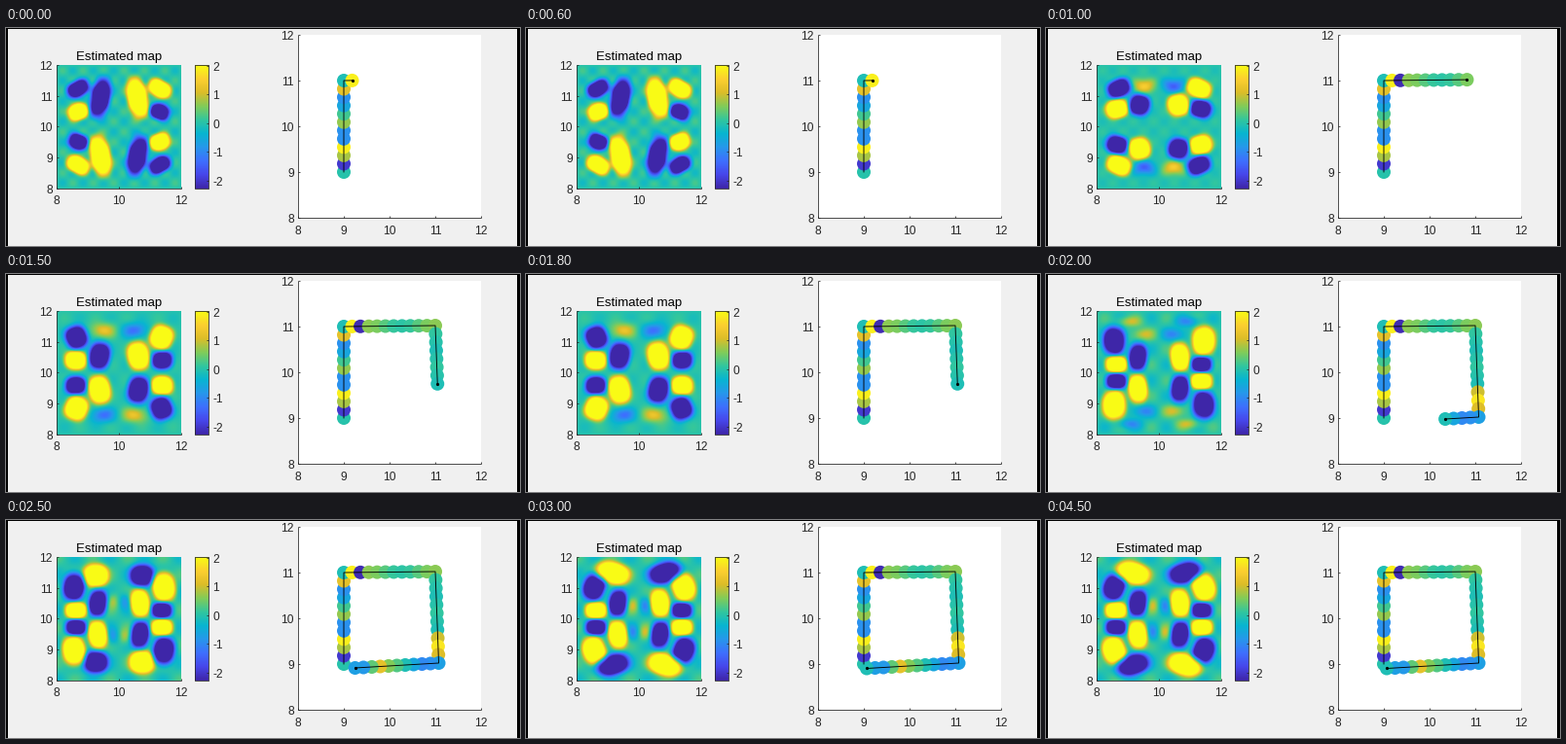
Write a matplotlib script that moves like this. It is 528 by 224 pixels and loops after 5.5 s.

```python
import numpy as np
import matplotlib.pyplot as plt
from matplotlib.animation import FuncAnimation
from matplotlib.colors import LinearSegmentedColormap
from matplotlib.patches import Rectangle

W, H, DPI = 528, 224, 100
PX = 72 / DPI
VMIN, VMAX = -2.27, 2.03
INK = "#262626"
plt.rcParams["font.family"] = "Liberation Sans"

parula = LinearSegmentedColormap.from_list("parula", [
    "#3e26a8", "#4747eb", "#3e6fff", "#2797eb", "#08b5d0",
    "#31c69f", "#81cc59", "#dcbd29", "#fccf30", "#f9fb15"])

fig = plt.figure(figsize=(W / DPI, H / DPI), dpi=DPI, facecolor="#f0f0f0")
ax = fig.add_axes([0, 0, 1, 1])

LEFT, RIGHT, TOP, BOTTOM = 52, 180, 38, 165
CX, CY = (LEFT + RIGHT) / 2, (TOP + BOTTOM) / 2
X, Y = np.meshgrid(np.arange(LEFT, RIGHT) + .5, np.arange(TOP, BOTTOM) + .5)


def blob(cx, cy, rx, ry, tilt=0, height=3.5, power=4):
    t = np.radians(tilt)
    dx, dy = X - cx, Y - cy
    a = np.abs(dx * np.cos(t) + dy * np.sin(t)) / rx
    b = np.abs(dy * np.cos(t) - dx * np.sin(t)) / ry
    return height * np.exp(-(a ** 2.4 + b ** 2.4) ** (power / 2.4))


def faint(cx, cy, rx, ry, height):
    return blob(cx, cy, rx, ry, 0, height, 2)


def field(quarter, amp, period):
    """Mirror the top left quarter with alternating sign, add ripples."""
    z = quarter - quarter[:, ::-1]
    z = z - z[::-1]
    k = 2 * np.pi / period
    return z + amp * np.sin(k * (X - CX)) * np.sin(k * (Y - CY))


def settled(tilt):
    """The three blobs that stay in place once the walk turns back."""
    return (blob(72, 92.8, 11, 8.5) - blob(70, 68.5, 11.5, 14.5, tilt)
            - blob(94.3, 85, 9.5, 14, 3))


MAPS = [
    field(blob(74, 86, 10.5, 8.5, -20) - blob(74, 62.5, 12, 8.5, -28)
          - blob(97, 72, 10, 20, 12), .25, 21),
    field(blob(73, 83, 11.5, 9.5, -15) - blob(75, 62, 12.5, 9.5, -22)
          - blob(96, 79, 11, 11, 15) + faint(101, 59.5, 11, 7, 1.5), .12, 21),
    field(blob(71.5, 88.5, 11, 9.5) - blob(72.5, 65, 11.5, 12, -20)
          - blob(96, 84, 11, 14, 8) + faint(100, 58, 12, 7, 1.3), .15, 32),
    field(settled(10) + faint(99, 62, 12, 6, 1)
          + faint(86, 49, 12, 5, .9), .3, 32),
    field(settled(14) + blob(92, 57, 13, 11.5)
          + faint(110, 83, 5, 8, .8), .3, 36),
    field(settled(24) + blob(89, 54.5, 17, 11, 14)
          + faint(110, 87, 5, 8, .9), .3, 36),
]

# The walk goes around a slightly skewed square, eleven steps a side
CORNERS = np.array([(347, 148), (347, 54), (441, 53), (444.5, 147), (350, 152.5)])
steps = np.arange(45) / 11
walk = np.column_stack([np.interp(steps, range(5), c) for c in CORNERS.T])
COUNTS = [13, 22, 30, 38, 44, 45]

i = np.arange(9)
readings = np.concatenate([
    [0, -2, .8, 1.9, -.9, -.9, .7, .2, -.6, -.9, 1.2, -.1, 1.9, -2.2],
    .35 + .3 * np.cos(np.pi * i / 4),
    .1 * np.cos(np.pi * i[:7] / 2),
    [1, 1.8, 1.1, -.7, -.9, -1, -.6, -.1, .3, .6, 1.2, .4, -.8, -.7, -.1]])


def rule(xs, ys):
    ax.plot(xs, ys, color=INK, lw=.8 * PX, zorder=3, solid_capstyle="butt")


def label(x, y, text, ha, size=12, color=INK):
    ax.text(x, y, text, ha=ha, va="center_baseline", color=color, fontsize=size * PX)


def axes_box(x0, x1, y0, y1, xticks, tick, label_y):
    rule([x0, x0, x1], [y0, y1, y1])
    for v in xticks:
        x = x0 + (x1 - x0) * (v - 8) / 4
        rule([x, x], [y1, y1 - tick])
        label(x, label_y, str(v), "center")
    for v in range(8, 13):
        y = y1 - (y1 - y0) * (v - 8) / 4
        rule([x0, x0 + tick], [y, y])
        label(x0 - 4, y + .5, str(v), "right")


ax.add_patch(Rectangle((300, 7), 188, 188, color="white", lw=0))
for x, y, w, h in [(0, 0, 2, H), (W - 3, 0, 3, H), (0, 0, W, 1)]:
    ax.add_patch(Rectangle((x, y), w, h, color="black", lw=0))

style = dict(cmap=parula, vmin=VMIN, vmax=VMAX, aspect="auto")
image = ax.imshow(MAPS[0], extent=(LEFT, RIGHT, BOTTOM, TOP),
                  interpolation="bilinear", **style)
ax.imshow(np.linspace(VMAX, VMIN, 256)[:, None],
          extent=(194, 208, BOTTOM, TOP), **style)
rule([194, 208, 208, 194, 194], [TOP, TOP, BOTTOM, BOTTOM, TOP])
for v in range(-2, 3):
    y = TOP + (VMAX - v) / (VMAX - VMIN) * (BOTTOM - TOP)
    rule([206, 208], [y, y])
    label(212.5, y + .5, str(v), "left")

axes_box(LEFT, RIGHT, TOP, BOTTOM, (8, 10, 12), 1.5, 176.5)
axes_box(300, 488, 7, 195, range(8, 13), 2, 207)
label(CX, 29, "Estimated map", "center", 13.2, "black")

dots = ax.scatter([], [], s=(14 * PX) ** 2, c=[], cmap=parula,
                  vmin=VMIN, vmax=VMAX, linewidths=0, zorder=4)
trail, = ax.plot([], [], color="black", lw=.9 * PX, zorder=5)
head, = ax.plot([], [], "o", color="black", ms=3.2 * PX, mew=0, zorder=6)

ax.set_xlim(0, W)
ax.set_ylim(H, 0)
ax.axis("off")


def update(frame):
    # The first stage holds for two steps, the last one to the end
    stage = min(max(frame - 1, 0), len(MAPS) - 1)
    n = COUNTS[stage]
    image.set_data(MAPS[stage])
    dots.set_offsets(walk[:n])
    dots.set_array(readings[:n])
    trail.set_data(walk[:n, 0], walk[:n, 1])
    head.set_data(walk[n - 1:n, 0], walk[n - 1:n, 1])
    return image, dots, trail, head


anim = FuncAnimation(fig, update, frames=11, interval=500,
                     repeat=True, repeat_delay=0, blit=False)
plt.show()
```
